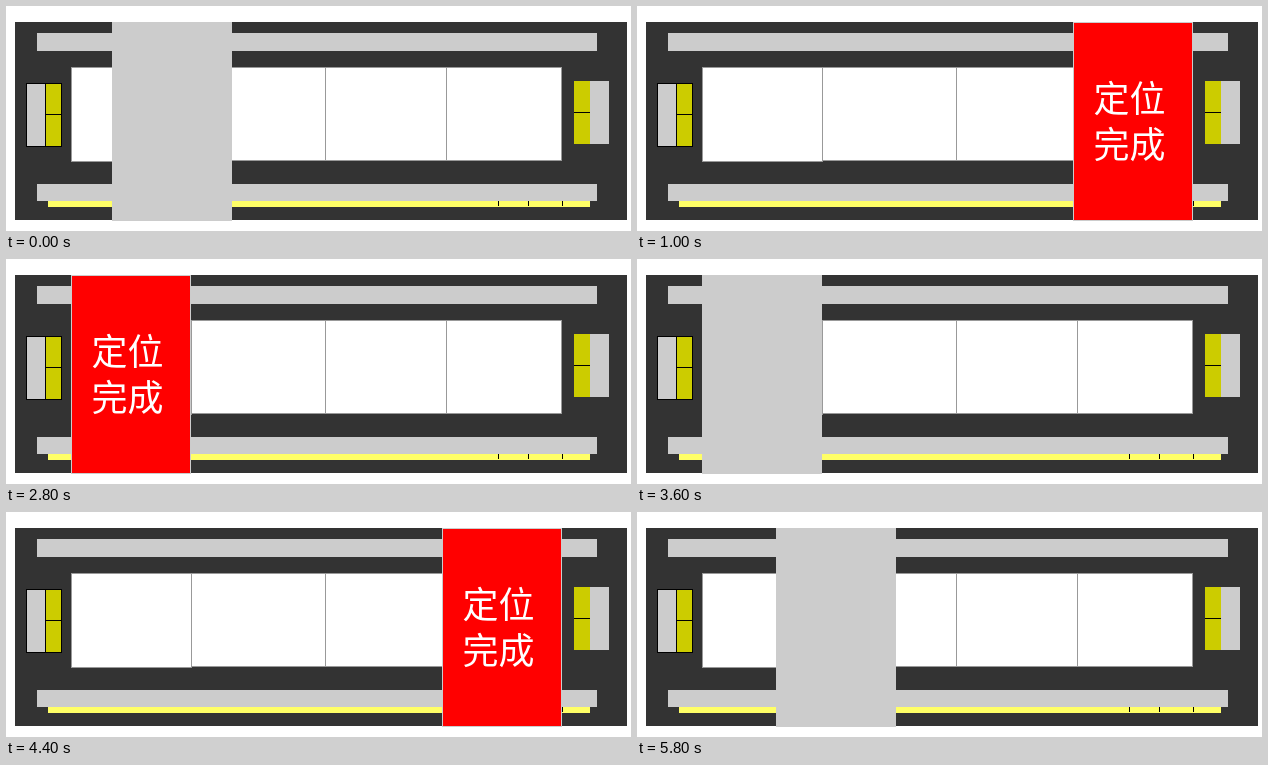
Write an HTML page that moves like this. It is 625 by 225 pixels and loops after 6000 ms.

```html
<!DOCTYPE html>
<html lang="zh-CN">
<head>
<meta charset="utf-8">
<title>定位</title>
<style>
  html, body { margin: 0; width: 100%; height: 100%; overflow: hidden; background: #fff; }
  svg { display: block; }
  .panel { fill: #fff; stroke: #999; }
  .grey { fill: #ccc; }
  .yellow { fill: #cc0; }
  .outlined { stroke: #000; }
  .line { stroke: #000; }
  text { fill: #fff; font: 36px "Noto Sans CJK SC", "Noto Sans CJK", "Noto Sans CJK JP", sans-serif; }
</style>
</head>
<body>
<svg width="625" height="225" viewBox="0 0 625 225">
  <g shape-rendering="crispEdges">
    <rect x="9" y="16" width="612" height="198" fill="#333"/>
    <rect class="grey" x="31" y="27" width="560" height="18"/>
    <rect x="42" y="194" width="542" height="7" fill="#ff6"/>
    <rect class="grey" x="31" y="178" width="560" height="17"/>
    <path class="line" d="M492.5 195v5M522.5 195v5M556.5 195v5"/>

    <rect class="panel" x="185.5" y="61.5" width="134" height="93"/>
    <rect class="panel" x="319.5" y="61.5" width="121" height="93"/>
    <rect class="panel" x="440.5" y="61.5" width="115" height="93"/>
    <rect class="panel" x="65.5" y="61.5" width="120" height="94"/>

    <rect class="grey outlined" x="20.5" y="77.5" width="19" height="63"/>
    <rect class="yellow outlined" x="39.5" y="77.5" width="16" height="63"/>
    <path class="line" d="M39 108.5h16"/>

    <rect class="yellow" x="568" y="75" width="16" height="63"/>
    <rect class="grey" x="584" y="75" width="19" height="63"/>
    <path class="line" d="M568 106.5h16"/>
  </g>
  <g id="carriage">
    <rect class="grey" y="16" width="120" height="199" shape-rendering="crispEdges"/>
    <rect id="alert" x="1" y="17" width="118" height="197" fill="#f00" shape-rendering="crispEdges"/>
    <g id="label">
      <text x="20.5" y="106">定位</text>
      <text x="20.5" y="152">完成</text>
    </g>
  </g>
</svg>
<script>
const LOOP = 6000;
const GREY = 0, RED = 1, LABELLED = 2;

// [start ms, carriage x, state]; the carriage jumps between stops.
const stops = [
  [0, 106, GREY], [200, 188, GREY], [400, 230, GREY], [600, 312, GREY], [800, 395, GREY],
  [1000, 436, LABELLED],
  [2000, 399, GREY], [2200, 325, GREY], [2400, 250, GREY], [2600, 102, GREY],
  [2800, 65, LABELLED],
  [3600, 65, GREY], [3800, 147, GREY], [4000, 271, GREY], [4200, 354, GREY],
  [4400, 436, LABELLED], [5200, 436, RED],
  [5400, 325, GREY], [5600, 213, GREY], [5800, 139, GREY]
];

const [carriage, alertBox, label] = ["carriage", "alert", "label"].map(id => document.getElementById(id));
const show = (element, visible) => element.setAttribute("visibility", visible ? "visible" : "hidden");

function draw(time) {
  const [, x, state] = stops.findLast(([start]) => start <= time % LOOP);
  carriage.setAttribute("transform", `translate(${x} 0)`);
  show(alertBox, state >= RED);
  show(label, state === LABELLED);
}

const begin = performance.now();
function tick() {
  draw(performance.now() - begin);
  requestAnimationFrame(tick);
}
tick();
</script>
</body>
</html>
```
